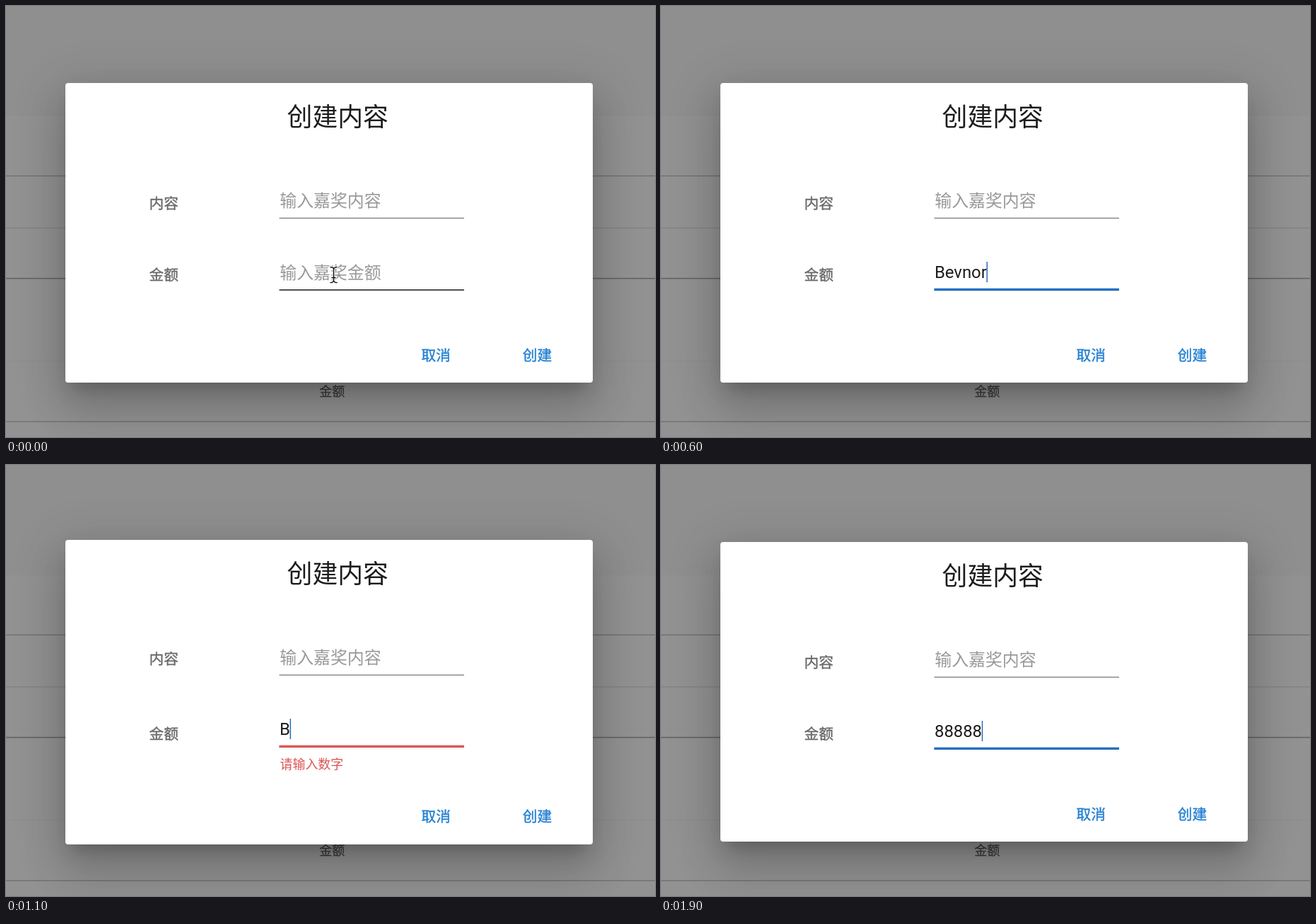
Recreate the animation shown at these times as an HTML page. Size 918 px wide and 610 px high, loop 2000 ms.

```html
<!DOCTYPE html>
<html lang="zh-CN">
<head>
<meta charset="utf-8">
<title>创建内容</title>
<style>
html, body { margin: 0; width: 100%; height: 100%; overflow: hidden; background: #8f8f8f; }
svg { position: absolute; left: 0; top: 0; display: block; }
#panel {
  position: absolute; left: 83.5px; width: 746.5px; background: #fff; border-radius: 4px;
  box-shadow: 0 16px 22px -10px rgba(0,0,0,.2), 0 36px 57px 4px rgba(0,0,0,.14), 0 13px 69px 12px rgba(0,0,0,.12);
}
text { font-family: "Noto Sans CJK SC", "Noto Sans CJK", "Noto Sans", sans-serif; }
.title { font-size: 35.8px; fill: #1c1c1c; }
.label { font-size: 20.7px; fill: #686868; stroke: #686868; stroke-width: .35; }
.hint { font-size: 23.9px; fill: #999; }
.value { font-family: Roboto, Arial, sans-serif; font-size: 23.85px; fill: #1c1c1c; }
.button { font-size: 20.7px; fill: #2480d2; stroke: #2480d2; stroke-width: .4; }
.error { font-size: 17.9px; fill: #db5353; }
.behind { font-size: 18px; fill: #3a3a3a; stroke: #3a3a3a; stroke-width: .25; }
</style>
</head>
<body>
<svg width="918" height="610" viewBox="0 0 918 610">
  <rect width="918" height="610" fill="#8f8f8f"/>
  <rect y="156" width="918" height="454" fill="#929292"/>
  <rect y="239.8" width="918" height="1.4" fill="#707070"/>
  <rect y="313.4" width="918" height="1.2" fill="#808080"/>
  <rect y="384.8" width="918" height="1.6" fill="#626262"/>
  <rect y="502.5" width="918" height="1" fill="#8b8b8b"/>
  <rect y="587.6" width="918" height="1.4" fill="#707070"/>
  <text class="behind" x="443.3" y="552">金额</text>
</svg>
<div id="panel"></div>
<svg width="918" height="610" viewBox="0 0 918 610">
  <text class="label" x="202.6" y="388.4">金额</text>
  <text class="label" id="contentLabel" x="202.6">内容</text>
  <g id="form">
    <text class="title" x="397.6" y="169.8">创建内容</text>
    <text class="hint" x="387.3" y="284">输入嘉奖内容</text>
    <rect x="386.5" y="299.6" width="261.5" height="1.4" fill="#858585"/>
    <text class="hint" id="hint" x="387.3" y="385.6">输入嘉奖金额</text>
    <text class="value" id="value" x="387" y="385.4"></text>
    <rect id="caret" y="362" width="1.5" height="29" fill="#2a6fb5"/>
    <rect x="386.5" y="401" width="261.5" height="1.7" fill="#343434"/>
    <rect id="underline" y="399.6" height="3" fill="#1c6fca"/>
  </g>
  <text class="error" id="error" x="387.6" y="429.9"></text>
  <g id="buttons">
    <text class="button" x="587.6" y="501.8">取消</text>
    <text class="button" x="730.8" y="501.8">创建</text>
  </g>
  <g id="pointer" fill="none" stroke-linecap="round">
    <path id="beam" d="M459 369.5q4 0 4.5 3q.5-3 4.5-3M463.5 372.5V388.5M459 391.5q4 0 4.5-3q.5 3 4.5 3M461 384.5h5" stroke="#fff" stroke-width="3.4"/>
    <use href="#beam" style="display:none"/>
    <path d="M459 369.5q4 0 4.5 3q.5-3 4.5-3M463.5 372.5V388.5M459 391.5q4 0 4.5-3q.5 3 4.5 3M461 384.5h5" stroke="#111" stroke-width="1.5"/>
  </g>
</svg>
<script>
const LOOP = 2000, STEP = 100;
const NAME = "Bevnor";
const el = id => document.getElementById(id);
const show = (id, on) => el(id).setAttribute("visibility", on ? "visible" : "hidden");
const set = (id, attrs) => Object.entries(attrs).forEach(([k, v]) => el(id).setAttribute(k, v));

// Number of name letters shown at each step while typing and deleting
const letters = { 300: 1, 400: 3, 500: 4, 600: 6, 700: 6, 800: 5, 900: 4, 1000: 2, 1100: 1 };

function valueAt(t) {
  if (t < 1500) return NAME.slice(0, letters[t] || 0);
  return "8".repeat(t < 1800 ? 2 : t < 1900 ? 4 : 5);
}

function render(ms) {
  const t = Math.floor((ms % LOOP) / STEP) * STEP;
  const value = valueAt(t);
  const invalid = t >= 700 && t < 1500;
  const caretOn = t >= 300 && t !== 1000 && t !== 1300 && t !== 1400;

  const panel = el("panel").style;
  panel.top = (invalid ? 106 : 109) + "px";
  panel.height = (invalid ? 431 : 423.5) + "px";
  set("form", { transform: `translate(0 ${invalid ? -3 : 0})` });
  set("buttons", { transform: `translate(0 ${invalid ? 3 : 0})` });
  set("contentLabel", { y: invalid ? 282.4 : 286.9 });

  el("value").textContent = value;
  show("hint", !value);
  el("error").textContent = !invalid ? "" : value ? "请输入数字" : "不能为空";

  const end = value ? el("value").getComputedTextLength() : 0;
  set("caret", { x: 386.7 + end });
  show("caret", caretOn);

  // Focus line grows from its centre
  const grow = 1 - (1 - Math.min(1, t / 200)) ** 2;
  const width = 261.5 * grow;
  set("underline", { x: 517.25 - width / 2, width, fill: invalid ? "#ea554f" : "#1c6fca" });
  show("pointer", t < 300);
}

const start = performance.now();
function tick() {
  render(performance.now() - start);
  requestAnimationFrame(tick);
}
render(0);
requestAnimationFrame(tick);
</script>
</body>
</html>
```
